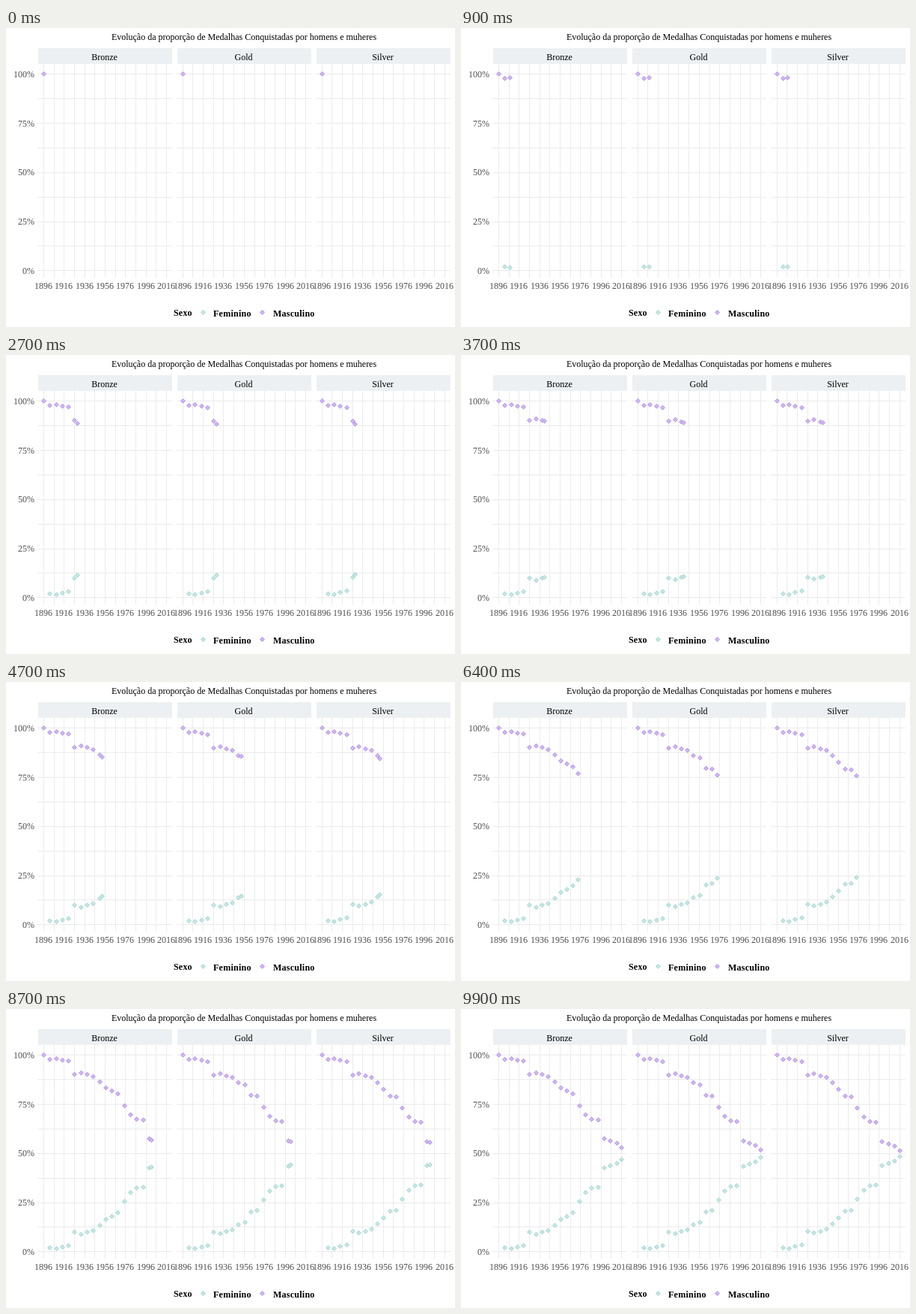
Write an HTML page with a canvas that moves like this. It is 600x400 px and loops after 10 s.

```html
<!DOCTYPE html>
<html lang="pt">
<head>
<meta charset="utf-8">
<style>
html, body { margin: 0; width: 600px; height: 400px; overflow: hidden; background: #fff; }
canvas { display: block; }
</style>
</head>
<body>
<canvas id="stage" width="600" height="400"></canvas>
<script>
const ctx = document.getElementById('stage').getContext('2d');
const SERIF = '"Liberation Serif", "Times New Roman", serif';
const FEMALE = ['#c6e6e4', '#a9d5d2'], MALE = ['#ceb7f0', '#b498de'];
const GRID = '#ebebeb', GREY = '#4d4d4d';
const STEPS = 100, STEP_MS = 100, TRAIL = 5, FIRST_FEMALE = 4;
const PANEL_GAP = 185.77, COLUMN = 13.68, ROW = 32.91;

// Male share as key points [step, y]; the panels differ in the middle and in a slow drift
const early = [[0, 61], [5, 67], [10, 66], [20, 70], [22.5, 75], [25, 88], [27, 92], [30, 86], [40, 91], [45, 98]];
const late = [[63, 117], [65, 131], [70, 143], [75, 149], [80, 150], [85, 176], [95, 182], [99, 188]];
const panels = [
  { title: 'Bronze', middle: [[50, 106], [60, 115]], drift: -3 },
  { title: 'Gold', middle: [[50, 101], [55, 115]], drift: 0 },
  { title: 'Silver', middle: [[50, 106], [55, 115]], drift: 1 }
];

function text(str, x, y, align = 'center', color = '#000', weight = 'normal', spacing = '0px') {
  ctx.font = `${weight} 12px ${SERIF}`;
  ctx.textAlign = align;
  ctx.fillStyle = color;
  ctx.letterSpacing = spacing;
  ctx.fillText(str, x, y);
}

// Small diamond centred on a pixel
function dot(x, y, [fill, edge]) {
  const cx = Math.round(x) + 0.5, cy = Math.round(y) + 0.5;
  ctx.beginPath();
  ctx.moveTo(cx - 3, cy);
  ctx.lineTo(cx, cy - 3);
  ctx.lineTo(cx + 3, cy);
  ctx.lineTo(cx, cy + 3);
  ctx.closePath();
  ctx.lineJoin = 'round';
  ctx.fillStyle = fill;
  ctx.strokeStyle = edge;
  ctx.fill();
  ctx.stroke();
}

function heightAt(step, { middle, drift }) {
  const path = [...early, ...middle, ...late];
  const i = Math.max(1, path.findIndex(([s]) => s >= step));
  const [s0, y0] = path[i - 1], [s1, y1] = path[i];
  return y0 + (y1 - y0) * (step - s0) / (s1 - s0) + drift * step / STEPS;
}

function drawPair(step, left, panel) {
  const x = left + 50 + 12 * COLUMN * step / (STEPS - 1);
  const y = heightAt(step, panel);
  if (step >= FIRST_FEMALE) dot(x, 385.6 - y, FEMALE);
  dot(x, y, MALE);
}

function drawPanel(left, title) {
  const edge = Math.round(left);
  ctx.fillStyle = '#ecf0f2';
  ctx.fillRect(edge + 43, 27, 179, 21);
  text(title, edge + 131.5, 43);
  ctx.fillStyle = GRID;
  for (let i = 0; i <= 8; i++) ctx.fillRect(edge + 42, Math.round(324.4 - ROW * i), 180, 1);
  for (let i = 0; i <= 12; i++) {
    const x = Math.round(left + 50 + COLUMN * i);
    ctx.fillStyle = GRID;
    ctx.fillRect(x, 48, 1, 286);
    if (i % 2 === 0) text(1896 + i * 10, x, 349, 'center', GREY);
  }
}

function draw(now) {
  const step = Math.floor(now / STEP_MS) % STEPS;
  ctx.fillStyle = '#fff';
  ctx.fillRect(0, 0, 600, 400);
  text('Evolução da proporção de Medalhas Conquistadas por homens e muheres', 318, 16);
  for (let i = 0; i <= 4; i++) text(i * 25 + '%', 38, 329 - i * 2 * ROW, 'right', GREY);

  panels.forEach((panel, i) => {
    const left = i * PANEL_GAP;
    drawPanel(left, panel.title);
    for (let s = 0; s < step; s += TRAIL) drawPair(s, left, panel);
    drawPair(step, left, panel);
  });

  text('Sexo', 224, 385, 'left', '#000', 'bold', '0.2px');
  dot(263, 380, FEMALE);
  text('Feminino', 277, 386, 'left', '#000', 'bold', '0.25px');
  dot(342, 380, MALE);
  text('Masculino', 357, 386, 'left', '#000', 'bold', '0.25px');
}

const start = performance.now();
function tick() {
  draw(performance.now() - start);
  requestAnimationFrame(tick);
}
tick();
</script>
</body>
</html>
```
